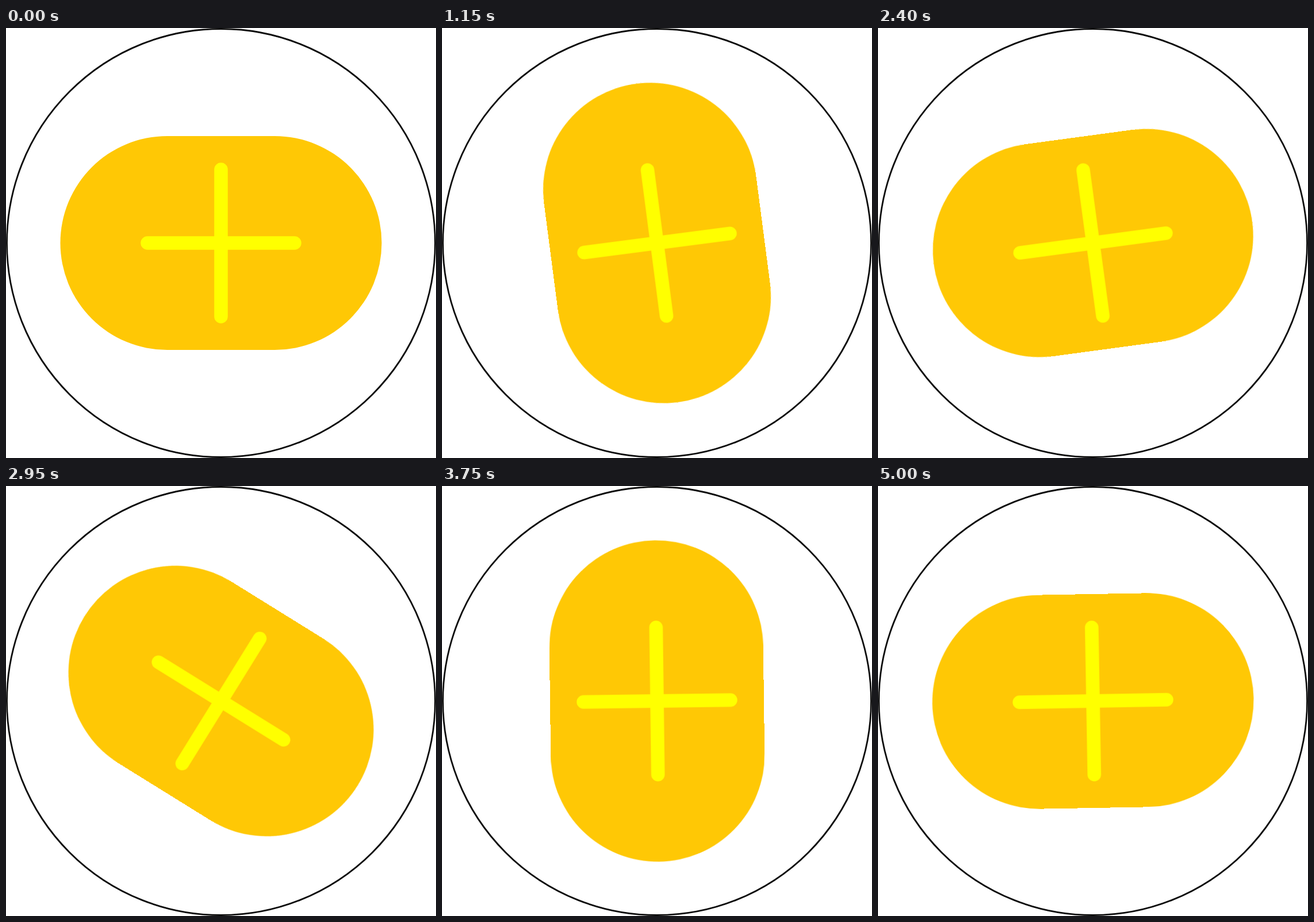
These frames come from a looping animation (748 px wide and 748 px high, 5050 ms). An HTML page:

```html
<!DOCTYPE html>
<html lang="en">
<head>
<meta charset="utf-8">
<title>Spinning pill</title>
<style>
  html, body { margin: 0; width: 100%; height: 100%; overflow: hidden; background: #fff; }
  svg { display: block; width: 100%; height: 100%; }
</style>
</head>
<body>
<svg viewBox="-374 -374 748 748">
  <circle r="372.5" fill="#fff" stroke="#0c0c0c" stroke-width="2.8"/>
  <g id="spinner">
    <rect x="-279.5" y="-186" width="559" height="372" rx="186" fill="#ffc805"/>
    <path d="M-128 0H128M0-128V128" stroke="#ff0" stroke-width="23.5" stroke-linecap="round"/>
  </g>
</svg>
<script>
  const STEPS = 101, STEP_MS = 50, STEP_DEG = 3.59;

  // The tiny head start keeps rounding from delaying a step at its boundary.
  document.getElementById('spinner').animate(
    [{ transform: 'rotate(0deg)' }, { transform: `rotate(${STEPS * STEP_DEG}deg)` }],
    { duration: STEPS * STEP_MS, delay: -1, iterations: Infinity, easing: `steps(${STEPS}, end)` }
  );
</script>
</body>
</html>
```
